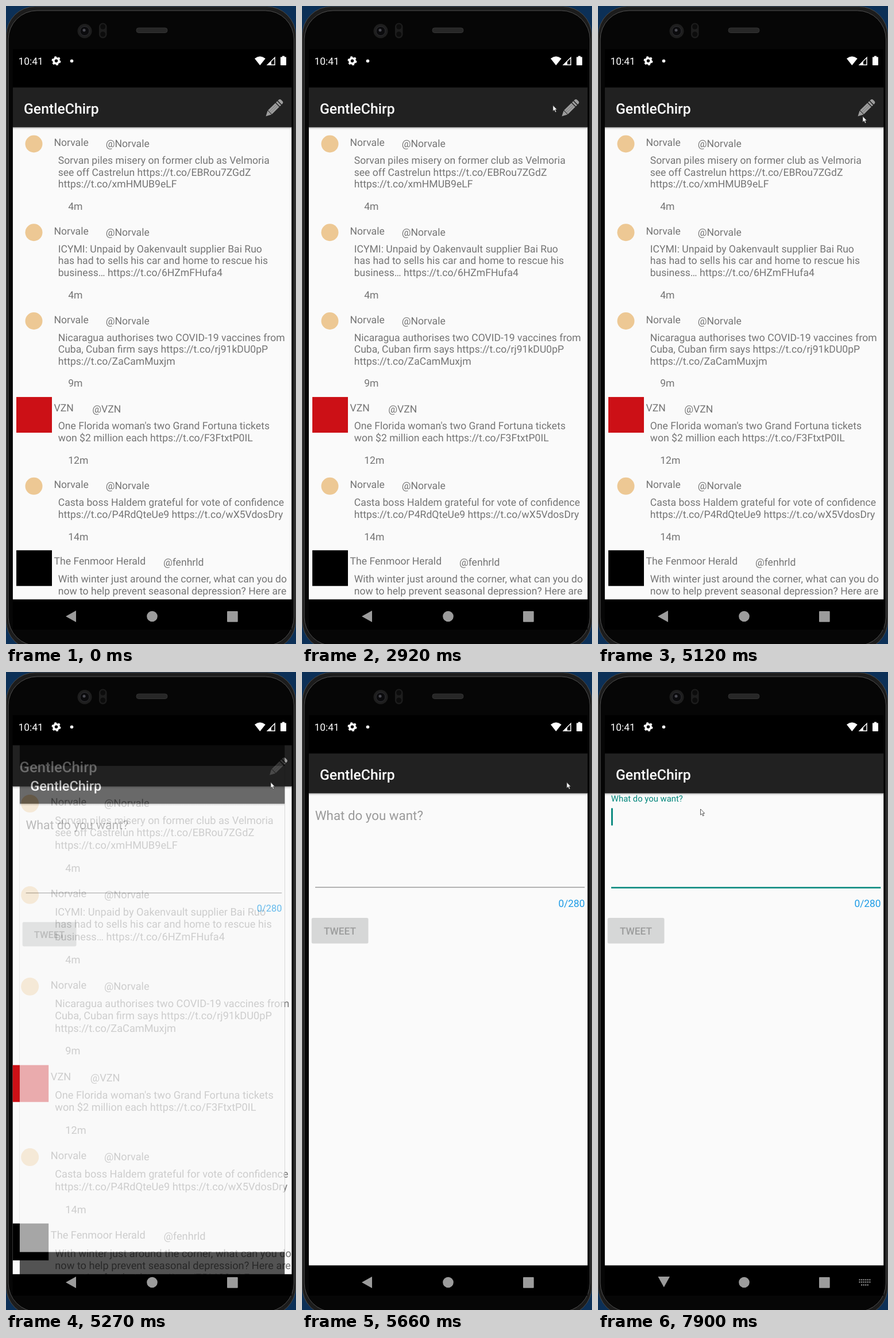
An HTML page for the animation above (8000 ms loop, 505 px wide and 1108 px high).

```html
<!DOCTYPE html>
<html lang="en">
<head>
<meta charset="utf-8">
<title>Phone timeline</title>
<style>
  html, body { margin: 0; width: 100%; height: 100%; overflow: hidden; background: #0c3057; }
  svg { display: block; width: 100vw; height: 100vh; }
  text { font: 17.33px Roboto, sans-serif; fill: #757575; text-rendering: geometricPrecision; white-space: pre; }
  #posts text { font-size: 17.6px; }
  .title { font-size: 24.75px; font-weight: 500; fill: #fff; }
  .button { font-weight: 500; fill: #9b9c9c; text-anchor: middle; }
  .counter { fill: #1c9be6; text-anchor: end; }
  .clock { fill: #fff; }
</style>
</head>
<body>
<svg viewBox="0 0 505 1108">
  <defs>
    <linearGradient id="shade" x2="0" y2="1">
      <stop stop-color="#000" stop-opacity=".22"/>
      <stop offset="1" stop-color="#000" stop-opacity="0"/>
    </linearGradient>
    <clipPath id="screen"><rect x="11.7" y="75" width="485.8" height="1008"/></clipPath>
    <clipPath id="page"><rect x="11.7" y="211" width="485.8" height="820"/></clipPath>
    <g id="window">
      <rect x="11.7" y="57" width="485.8" height="1026"/>
      <rect x="11.7" y="210" width="485.8" height="820.5" fill="#fafafa"/>
      <rect x="11.7" y="210.7" width="485.8" height="4" fill="url(#shade)"/>
      <rect x="11.7" y="141.5" width="485.8" height="69.2" fill="#212121"/>
      <text class="title" x="31" y="186.5">GentleChirp</text>
    </g>
  </defs>

  <!-- phone body -->
  <rect width="505" height="1108" fill="#0c3057"/>
  <rect x=".5" y="1" width="504" height="1117" rx="50" fill="#1c1c1c" stroke="#4a4a4a"/>
  <rect x="4" y="8" width="497.5" height="1103" rx="50" fill="#060606" stroke="#505050"/>
  <rect x="11.7" y="75" width="485.8" height="1008" rx="24"/>
  <circle cx="137" cy="43.5" r="12.5" fill="#1e1e1e"/>
  <circle cx="137" cy="43.5" r="8" fill="#0b0b0d" stroke="#303034"/>
  <circle cx="136" cy="42" r="2.5" fill="#4a4a52"/>
  <rect x="162" y="29.5" width="13.5" height="26.5" rx="6.5" fill="#1d1d1d"/>
  <circle cx="168.7" cy="36" r="4.5" fill="#0c0c0c"/>
  <circle cx="168.7" cy="49" r="4.5" fill="#0c0c0c"/>
  <rect x="227" y="38" width="54" height="8.5" rx="4" fill="#272727" stroke="#333"/>

  <g clip-path="url(#screen)">
    <g id="timeline">
      <use href="#window"/>
      <g transform="translate(452.5 191.5) rotate(-44.5)" fill="#9d9d9d">
        <path d="M0 0L9-4.8V4.8ZM10-4.8H28V4.8H10ZM29.5-4.8h3v9.6h-3ZM34-4.8h1.5a3.5 3.5 0 0 1 3.5 3.5v2.6a3.5 3.5 0 0 1-3.5 3.5H34Z"/>
        <path d="M10-1.6H28M10 1.6H28" stroke="#707070" stroke-width=".8"/>
      </g>
      <g id="posts" clip-path="url(#page)"></g>
    </g>
    <g id="compose">
      <use href="#window"/>
      <text id="hint" x="22.8">What do you want?</text>
      <rect id="underline" x="23" y="373.3" width="469.3"/>
      <rect id="caret" x="23" y="236.5" width="2.8" height="30" fill="#00857a"/>
      <text class="counter" x="492.5" y="408.3">0/280</text>
      <rect x="16.7" y="427" width="98.8" height="44.5" rx="2.5" fill="#d6d7d7"/>
      <text class="button" x="66" y="456">TWEET</text>
    </g>
  </g>

  <!-- status bar -->
  <g fill="#fff">
    <text class="clock" x="21.5" y="102.3">10:41</text>
    <g fill="none" stroke="#fff" transform="translate(87.5 95.3)">
      <circle r="4.6" stroke-width="3.6"/>
      <circle r="6.7" stroke-width="2.6" stroke-dasharray="3.5 3.516"/>
    </g>
    <circle cx="114.5" cy="95.5" r="2.8"/>
    <path d="M433 91.2Q442.3 84 451.7 91.2L442.3 103Z"/>
    <path d="M455.5 102.3H468V89.5Z" fill="none" stroke="#fff" stroke-width="1.5"/>
    <path d="M454 103L462 95V103Z"/>
    <path d="M481 86.7h4v1.8h2.2q.8 0 .8.8v12.9q0 .8-.8.8h-8.4q-.8 0-.8-.8V89.3q0-.8.8-.8H481Z"/>
  </g>

  <!-- navigation bar -->
  <g fill="#9c9c9c">
    <path id="back"/>
    <circle cx="254.5" cy="1060" r="9.3"/>
    <rect x="385" y="1051" width="18.7" height="18.7" rx="1"/>
    <path id="keyboard" d="M454.5 1055.5h20M454.5 1059.5h20M458 1064.5h13" fill="none"
      stroke="#9c9c9c" stroke-width="2.2" stroke-dasharray="2.2 1.35"/>
  </g>

  <path id="pointer" d="M0 0V10.2L2.4 8L4.1 12L5.9 11.2L4.2 7.4H7.2Z" fill="#fff" stroke="#333" stroke-width=".8"/>
</svg>

<script>
const LOOP = 8000;
const CENTER = [254.5, 570];
const $ = id => document.getElementById(id);
const set = (id, attrs) => Object.entries(attrs).forEach(([k, v]) => $(id).setAttribute(k, v));
const clamp = v => Math.min(1, Math.max(0, v));
const mix = (a, b, p) => a + (b - a) * p;

const AGENCY = { name: 'Norvale', handle: '@Norvale', handleX: 173.7, color: '#edc894', round: true };
const CHANNEL = { name: 'VZN', handle: '@VZN', handleX: 150.3, color: '#cc1016' };
const PAPER = { name: 'The Fenmoor Herald', handle: '@fenhrld', handleX: 273.9, color: '#000' };

const posts = [
  [AGENCY, '4m', 'Sorvan piles misery on former club as Velmoria',
    'see off Castrelun https://t.co/EBRou7ZGdZ', 'https://t.co/xmHMUB9eLF'],
  [AGENCY, '4m', 'ICYMI: Unpaid by Oakenvault supplier Bai Ruo',
    'has had to sells his car and home to rescue his', 'business… https://t.co/6HZmFHufa4'],
  [AGENCY, '9m', 'Nicaragua authorises two COVID-19 vaccines from',
    'Cuba, Cuban firm says https://t.co/rj91kDU0pP', 'https://t.co/ZaCamMuxjm'],
  [CHANNEL, '12m', "One Florida woman's two Grand Fortuna tickets",
    'won $2 million each https://t.co/F3FtxtP0IL'],
  [AGENCY, '14m', 'Casta boss Haldem grateful for vote of confidence',
    'https://t.co/P4RdQteUe9 https://t.co/wX5VdosDry'],
  [PAPER, '15m', 'With winter just around the corner, what can you do',
    'now to help prevent seasonal depression? Here are', 'some tips for that https://t.co/ZPMC9wLF'],
];

function buildPosts() {
  const LINE = 20.65;
  const label = (x, y, s) => `<text x="${x}" y="${y}">${s}</text>`;
  let y = 243;
  $('posts').innerHTML = posts.map(([who, age, ...lines]) => {
    const avatar = who.round
      ? `<circle cx="48.5" cy="${y - 3.5}" r="15" fill="${who.color}"/>`
      : `<rect x="18" y="${y - 25.2}" width="62" height="62" fill="${who.color}"/>`;
    const parts = avatar + label(83.5, y, who.name) + label(who.handleX, y + 2, who.handle)
      + lines.map((s, i) => label(90.7, y + 31 + i * LINE, s)).join('')
      + label(108.2, y + 49 + lines.length * LINE, age);
    y += 91.8 + lines.length * LINE;
    return parts;
  }).join('');
}

// Pointer strokes: start, end, then one position per evenly spaced step.
const strokes = [
  [680, 1550, [309, 922], [315, 850], [325, 760], [338, 660], [350, 560], [363, 467.5], [361, 470], [356, 474]],
  [1800, 2490, [340, 479], [362, 400], [405, 300], [440, 215], [462, 160], [464, 174]],
  [2920, 3880, [437, 172.5], [385, 275], [250, 400], [103, 471], [160, 455], [270, 405], [355, 340], [404, 296]],
  [4000, 4420, [418, 268], [440, 230], [456, 203], [461, 191.5]],
  [5810, 6830, [430, 205], [330, 260], [200, 330], [90, 373], [12, 350], [40, 290], [100, 252], [150, 239], [178.5, 238]],
];

function pointerAt(t) {
  const stroke = strokes.filter(s => s[0] <= t).pop();
  if (!stroke) return null;
  const [start, end, ...points] = stroke;
  const last = points.length - 1;
  return points[Math.min(last, Math.floor((t - start) / (end - start) * last + 0.08))];
}

const scaled = s => {
  const [x, y] = CENTER;
  return `translate(${x} ${y}) scale(${s}) translate(${-x} ${-y})`;
};

const refreshes = [0, 5270, 5390, 5520, 5660, 7110, 7270, 7430];

function render(t) {
  const shown = refreshes.filter(r => r <= t).pop();

  const open = 1 - (1 - clamp((shown - 5160) / 460)) ** 4;
  set('timeline', { transform: scaled(mix(1, 1.05, open)), visibility: open < 1 ? 'visible' : 'hidden' });
  set('compose', { transform: scaled(mix(0.85, 1, open)), opacity: open });

  const float = clamp((shown - 7190) / 167);
  const focused = float > 0;
  $('hint').style.fontSize = mix(22.35, 14.85, float) + 'px';
  $('hint').style.fill = focused ? '#00857a' : '#9a9a9a';
  set('hint', { y: mix(257.3, 225, float) });
  set('underline', { height: focused ? 2.5 : 1.2, fill: focused ? '#00857a' : '#858585' });

  const typing = float === 1;
  set('caret', { visibility: typing ? 'visible' : 'hidden' });
  set('keyboard', { visibility: typing ? 'visible' : 'hidden' });
  set('back', { d: typing ? 'M104.5 1050H125L114.8 1068.5Z' : 'M104 1060L122 1050V1070Z' });

  const at = pointerAt(t);
  set('pointer', { visibility: at ? 'visible' : 'hidden', transform: `translate(${at || [0, 0]})` });
}

buildPosts();
const began = performance.now();
function tick() {
  render((performance.now() - began) % LOOP);
  requestAnimationFrame(tick);
}
tick();
</script>
</body>
</html>
```
